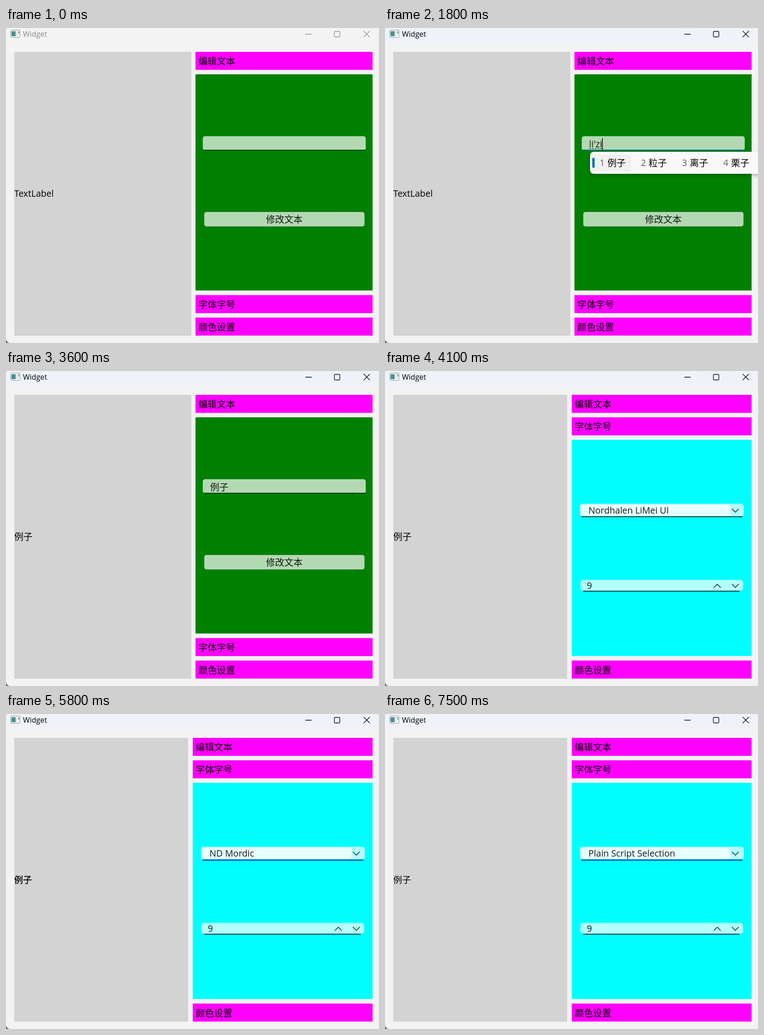
An HTML page for the animation above (8 s loop, 815 by 687 pixels).

```html
<!DOCTYPE html>
<html lang="zh-CN">
<head>
<meta charset="utf-8">
<title>Widget</title>
<style>
  html, body { margin: 0; width: 100%; height: 100%; overflow: hidden; }
  svg { display: block; width: 100vw; height: 100vh; }
  text { font: 19.6px "Open Sans", "Noto Sans CJK SC", "Noto Sans CJK", sans-serif; white-space: pre; }
  .zh { font: 20px "Noto Sans CJK SC", "Noto Sans CJK", sans-serif; }
  .title { font-size: 16.2px; }
  .ink { fill: #000; fill-opacity: .9; }
  .num { fill: #606060; }
  .head { fill: #f0f; }
  .box { fill: #fff; fill-opacity: .7; }
  .hover .box { fill: #f9f9f9; fill-opacity: .5; }
  .press .box { fill: #f9f9f9; fill-opacity: .3; }
  .line { fill: none; stroke: #000; stroke-width: 1.4; }
  .chevron { fill: none; stroke: #111; stroke-width: 1.4; }
  .focus { fill: none; stroke: #0067c0; }
  .caret { stroke: #000; stroke-width: 1.5; }
  .chrome { fill: none; stroke: #000; stroke-width: 1.3; }
  .inactive .chrome { stroke: #8e8e8e; }
  .inactive .title { fill: #8a8a8a; }
  .popup { filter: drop-shadow(0 4px 4px rgba(0, 0, 0, .25)); }
</style>
</head>
<body>
<svg viewBox="0 0 815 687">
  <defs>
    <linearGradient id="bar" x2="0" y2="1">
      <stop offset=".7" stop-color="#eff3f9"/>
      <stop offset="1" stop-color="#f3f3f3"/>
    </linearGradient>
  </defs>

  <rect width="815" height="687" fill="#7d6a58"/>
  <path d="M0 2Q0 0 3 0H815V687H9Q2 686 0 679Z" fill="#f3f3f3"/>

  <g id="frame">
    <rect data-on="600 8000" x="1" width="814" height="40" fill="url(#bar)"/>
    <rect x="10.5" y="4.5" width="20" height="16" rx="1" fill="#f8f8f8" stroke="#8b9094"/>
    <rect x="12" y="7" width="9" height="11" fill="#4a8f91"/>
    <rect x="22" y="7" width="4" height="11" fill="#dfe5e6"/>
    <rect x="27" y="7" width="2" height="5" fill="#5b9a84"/>
    <text class="title" x="37" y="19">Widget</text>
    <path class="chrome" d="M654 13.5H668M781.5 6.5L795 20M795 6.5L781.5 20"/>
    <rect class="chrome" x="717.5" y="7.5" width="12" height="12" rx="1.5"/>
  </g>

  <rect id="panel" x="18" y="52" width="387" height="619" fill="#d3d3d3"/>
  <text id="label" x="18" y="368"></text>

  <g data-on="0 4100">
    <rect x="414" y="101" width="387" height="471.5" fill="#008000"/>
    <g id="edit">
      <rect class="box" x="430" y="236" width="356" height="31" rx="5"/>
      <path class="line" d="M431 266.4H785"/>
      <path class="focus" data-on="600 3200" stroke-width="1.6" d="M431 266.4H785"/>
      <text id="typed" class="ink" x="446" y="260"></text>
      <path id="dash" d="" stroke="#000" stroke-dasharray="4 2"/>
      <path id="caret" class="caret" d="M0 240V266.5" data-on="600 1100 1500 2100 2600 3000"/>
    </g>
    <g id="button">
      <rect class="box" x="433" y="401" width="350.5" height="32" rx="5" stroke="#000" stroke-opacity=".16" stroke-width="1.4"/>
      <text class="zh ink" x="608" y="424.6" text-anchor="middle">修改文本</text>
    </g>
  </g>

  <g data-on="4100 8000">
    <rect x="408" y="150" width="393" height="471.5" fill="#0ff"/>
    <g id="combo">
      <rect class="box" x="426" y="289.5" width="358" height="28" rx="5"/>
      <rect class="box" x="428" y="291" width="327" height="24.5" rx="5"/>
      <path class="line" d="M429 317.7H781"/>
      <path class="focus" data-on="5300 8000" stroke="#0078d4" stroke-width="3.2" d="M429 318.6H781"/>
      <text id="font" class="ink" x="444.5" y="311"></text>
      <path class="chevron" d="M758 300.5L765.5 308L773 300.5"/>
      <path id="comboCaret" class="caret" d="M0 291V316" data-on="5300 5500 6100 6500 7000 7500"/>
    </g>
    <rect class="box" x="427" y="455.5" width="355.5" height="23.5" rx="6"/>
    <path class="line" d="M433 480.2H775"/>
    <text class="ink" x="441" y="475">9</text>
    <path class="chevron" d="M718.5 472.5L726 465L733.5 472.5M758 464.5L765.5 472L773 464.5"/>
  </g>

  <g id="heads"></g>

  <g class="popup" data-on="1500 2000">
    <path d="M830 270H457Q448 270 448 279V309Q448 318 457 318H830Z" fill="#f9f9f9"/>
    <rect id="pick" x="453" y="276" height="36.5" rx="5" fill="#f0f0f0"/>
    <rect x="453" y="283" width="5" height="22" rx="2.5" fill="#0067c0"/>
    <g id="choices"></g>
  </g>
</svg>

<script>
const LOOP = 8000;
const $ = id => document.getElementById(id);

// Each list holds [start time, value].
const typing = [[0, ""], [1500, "l"], [1600, "li"], [1700, "li'z"], [1800, "li'zi"], [2000, "例子"]];
const candidates = [[0, "了 里 来 老 两"], [1600, "里 力 离 理 利"], [1700, "例子 粒子 离子 栗子"]];
const editState = [[0, ""], [200, "hover"], [600, ""]];
const buttonState = [[0, ""], [3000, "hover"], [3200, "press"], [3300, "hover"], [3600, ""]];
const comboState = [[0, ""], [4700, "hover"], [5300, ""]];
const fonts = [
  [0, "Nordhalen LiMei UI"], [5300, "NangVoU_KRTES-ExtB"], [5500, "Novarin Taleti"],
  [5600, "ND Loden"], [5800, "ND Mordic"], [6100, "ND PU Mordic"], [6400, "Orvanda Text"],
  [6500, "Niravel UI"], [6600, "NTalSun"], [6700, "Pelorin Script"],
  [6800, "Perlantine Lineworks"], [7000, "Selvan MDX Signs"], [7100, "Sanvera Ruled"],
  [7300, "Plain Script Selection"]
];
// Label look: size, weight, outline width
const looks = [
  [0, [20, 400, 0]], [5300, [19.5, 400, 0]], [5800, [19.3, 400, .35]],
  [6400, [20, 400, 0]], [6600, [19.3, 300, 0]], [6800, [20, 400, 0]], [7300, [19.3, 300, 0]]
];

const at = (steps, t) => steps.filter(s => s[0] <= t).pop()[1];
const shown = (times, t) => times.filter(s => s <= t).length % 2 === 1;
const timed = [...document.querySelectorAll("[data-on]")].map(el => [el, el.dataset.on.split(" ").map(Number)]);

function setText(el, value) {
  if (el.textContent !== value) el.textContent = value;
}

function setHtml(el, value) {
  if (el.key !== value) el.innerHTML = el.key = value;
}

function drawHeads(second) {
  const x = second ? 408 : 414;
  const tops = second ? [52, 101, 631.5] : [52, 582.5, 631.5];
  setHtml($("heads"), ["编辑文本", "字体字号", "颜色设置"].map((name, i) =>
    `<rect class="head" x="${x}" y="${tops[i]}" width="${801 - x}" height="39.3"/>` +
    `<text class="zh" x="${x + 6.5}" y="${tops[i] + 28}">${name}</text>`).join(""));
  $("panel").setAttribute("width", x - 28 + (second ? 0 : 1));
}

function drawChoices(t) {
  const words = at(candidates, t).split(" ");
  const pitch = 50 + 20 * words[0].length;
  $("pick").setAttribute("width", pitch - 5);
  setHtml($("choices"), words.map((word, i) => {
    const x = 469 + i * pitch;
    return `<text class="num" x="${x}" y="301">${i + 1}</text><text class="zh" x="${x + 17}" y="302">${word}</text>`;
  }).join(""));
}

function drawEdit(t) {
  const value = at(typing, t);
  const text = $("typed");
  text.setAttribute("class", t >= 2000 ? "zh ink" : "ink");
  text.setAttribute("y", t >= 2000 ? 261 : 260);
  setText(text, value);
  const end = 446 + (value ? text.getComputedTextLength() : 0);
  $("caret").setAttribute("transform", `translate(${end + .5})`);
  $("dash").setAttribute("d", t >= 1500 && t < 2000 ? `M446 262.5H${end}` : "");
}

function drawLabel(t) {
  const label = $("label");
  const changed = t >= 3300;
  const [size, weight, outline] = at(looks, t);
  label.setAttribute("class", changed ? "zh" : "");
  label.setAttribute("y", changed ? 369 : 368);
  label.style.cssText = changed
    ? `font-size:${size}px;font-weight:${weight};stroke:#000;stroke-width:${outline}` : "";
  setText(label, changed ? "例子" : "TextLabel");
}

function draw() {
  const t = performance.now() % LOOP;
  for (const [el, times] of timed) el.style.display = shown(times, t) ? "" : "none";
  $("frame").setAttribute("class", t < 600 ? "inactive" : "");
  $("edit").setAttribute("class", at(editState, t));
  $("button").setAttribute("class", at(buttonState, t));
  $("combo").setAttribute("class", at(comboState, t));
  drawHeads(t >= 4100);
  drawLabel(t);
  if (t < 4100) {
    drawEdit(t);
    drawChoices(t);
  } else {
    setText($("font"), at(fonts, t));
    $("comboCaret").setAttribute("transform", `translate(${445.5 + $("font").getComputedTextLength()})`);
  }
  requestAnimationFrame(draw);
}
draw();
</script>
</body>
</html>
```
